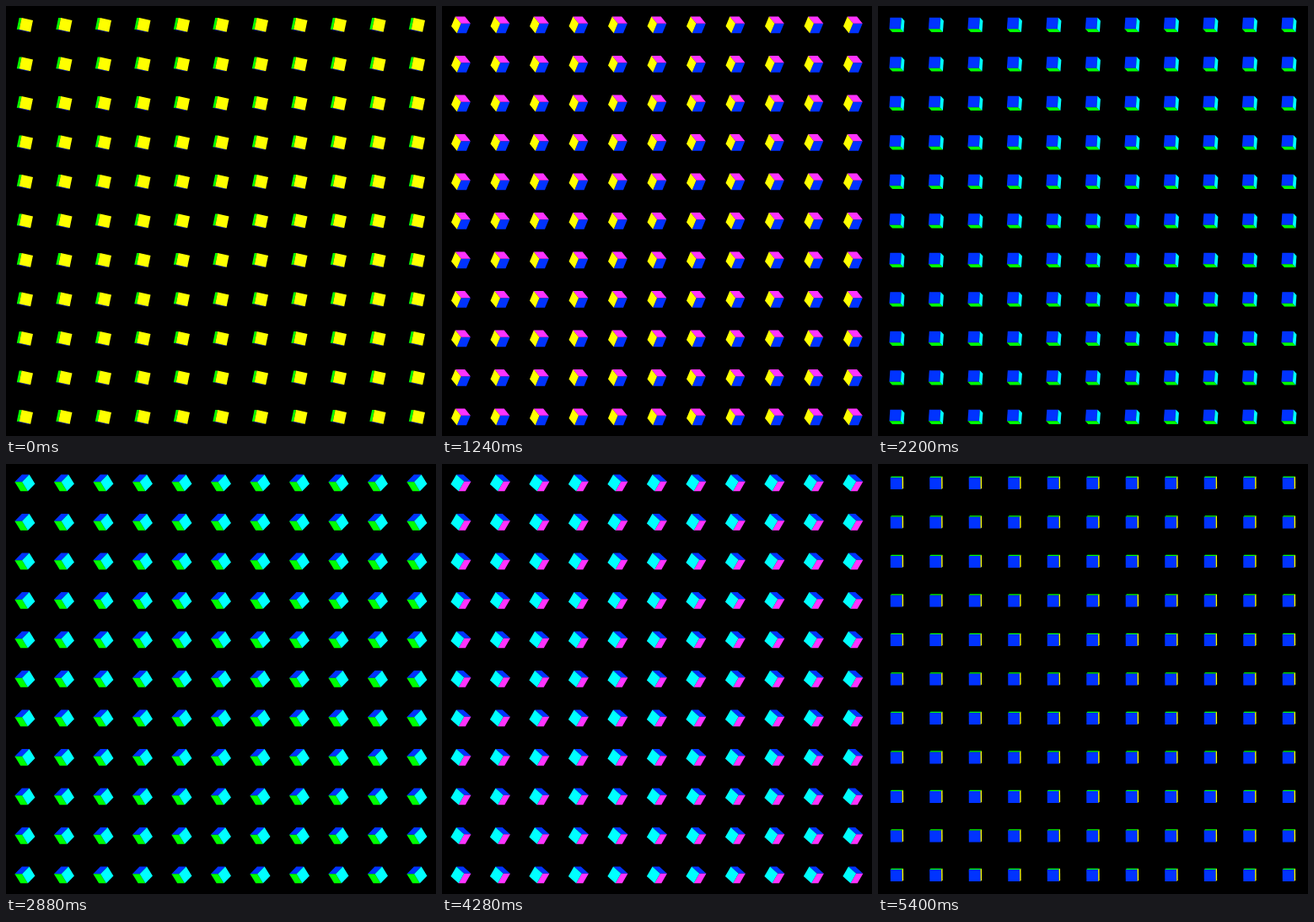
Write an HTML page without scripts that moves like this. It is 510 px wide and 510 px high and loops after 5.44 s.

```html
<!DOCTYPE html>
<html lang="en">
<head>
<meta charset="utf-8">
<title>Turning cubes</title>
<style>
  @property --a {
    syntax: "<angle>";
    inherits: true;
    initial-value: 12deg;
  }
  html, body {
    margin: 0;
    width: 100%;
    height: 100%;
    overflow: hidden;
    background: #000;
  }
  svg {
    display: block;
    width: 100%;
    height: 100%;
    animation: turn 5440ms steps(136) infinite;
  }
  @keyframes turn {
    from { --a: 12deg; }
    to { --a: -277.7deg; }
  }

  /* Cube axes in the flat view: p = (s, 0), q = (-cc, -s), r = (-sc, c) */
  .cube path {
    --c: cos(var(--a));
    --s: sin(var(--a));
    --qx: calc(-1 * var(--c) * var(--c));
    --qy: calc(-1 * var(--s));
    --rx: calc(-1 * var(--s) * var(--c));
    --ry: calc(1 * var(--c));
  }
  .yellow, .cyan {
    transform: matrix(var(--qx), var(--qy), var(--rx), var(--ry), calc(var(--d) * var(--s)), 0);
    opacity: calc(var(--d) * var(--c) * 999);
  }
  .green, .pink {
    transform: matrix(calc(1 * var(--s)), 0, var(--rx), var(--ry), calc(var(--d) * var(--qx)), calc(var(--d) * var(--qy)));
    opacity: calc(var(--d) * var(--c) * var(--s) * 999);
  }
  .blue {
    transform: matrix(var(--qx), var(--qy), calc(1 * var(--s)), 0, calc(var(--d) * var(--rx)), calc(var(--d) * var(--ry)));
  }
  /* d: distance of the face from the centre */
  .yellow { --d: 7; fill: #ff0; }
  .cyan { --d: -7; fill: #0ff; }
  .green { --d: 7; fill: #0f0; }
  .pink { --d: -7; fill: #f3f; }
  .blue { --d: 7; fill: #03f; }
</style>
</head>
<body>
<svg viewBox="0 0 510 510">
  <defs>
    <g id="cube" class="cube">
      <path class="blue" d="M-7-7h14v14h-14z"/>
      <path class="green" d="M-7-7h14v14h-14z"/>
      <path class="pink" d="M-7-7h14v14h-14z"/>
      <path class="yellow" d="M-7-7h14v14h-14z"/>
      <path class="cyan" d="M-7-7h14v14h-14z"/>
    </g>
    <g id="row">
      <use href="#cube"/>
      <use href="#cube" x="46.5"/>
      <use href="#cube" x="93"/>
      <use href="#cube" x="139.5"/>
      <use href="#cube" x="186"/>
      <use href="#cube" x="232.5"/>
      <use href="#cube" x="279"/>
      <use href="#cube" x="325.5"/>
      <use href="#cube" x="372"/>
      <use href="#cube" x="418.5"/>
      <use href="#cube" x="465"/>
    </g>
  </defs>
  <g transform="translate(22.4 22.4)">
    <use href="#row"/>
    <use href="#row" y="46.5"/>
    <use href="#row" y="93"/>
    <use href="#row" y="139.5"/>
    <use href="#row" y="186"/>
    <use href="#row" y="232.5"/>
    <use href="#row" y="279"/>
    <use href="#row" y="325.5"/>
    <use href="#row" y="372"/>
    <use href="#row" y="418.5"/>
    <use href="#row" y="465"/>
  </g>
</svg>
</body>
</html>
```
